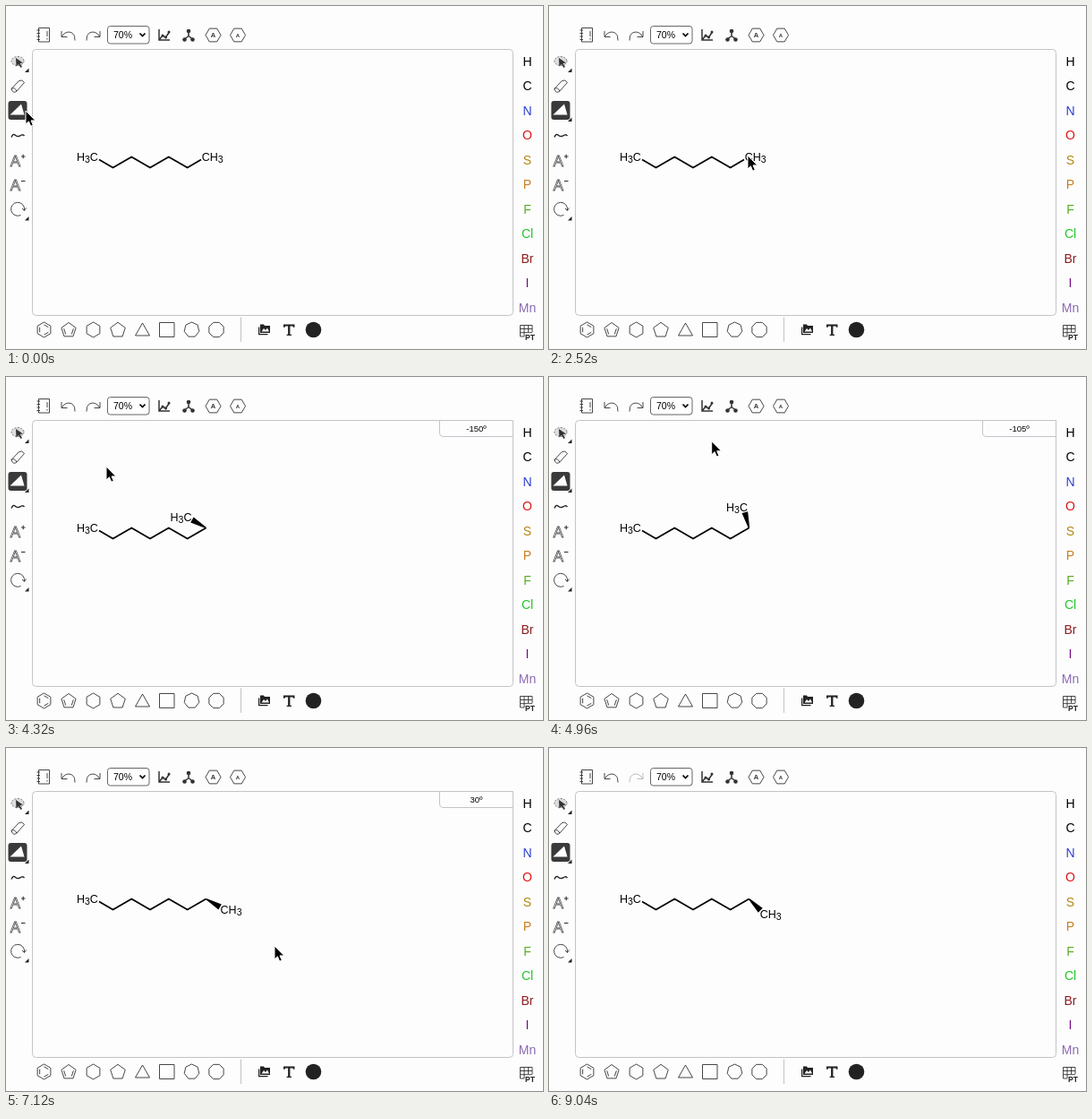
Write an HTML page that moves like this. It is 600x383 px and loops after 9.52 s.

```html
<!DOCTYPE html>
<html lang="en">
<head>
<meta charset="utf-8">
<title>Chain editor</title>
<style>
html, body { margin: 0; width: 100%; height: 100%; overflow: hidden; background: #fdfdfe; }
svg { display: block; font-family: "Liberation Sans", Arial, sans-serif; }
</style>
</head>
<body>
<svg id="stage" width="600" height="383" viewBox="0 0 600 383"></svg>
<script>
const NS = 'http://www.w3.org/2000/svg';
const stage = document.getElementById('stage');
const INK = '#333', THIN = { fill: 'none', stroke: INK, 'stroke-width': 0.9 };

function add(tag, attrs, parent = stage) {
  const el = document.createElementNS(NS, tag);
  for (const k in attrs) el.setAttribute(k, attrs[k]);
  return parent.appendChild(el);
}
const group = (parent = stage) => add('g', {}, parent);
const line = (d, parent, extra) => add('path', { ...THIN, d, ...extra }, parent);
const solid = (d, parent, fill = INK) => add('path', { d, fill }, parent);
function text(s, x, y, size, extra, parent) {
  const el = add('text', { x, y, 'font-size': size, 'text-anchor': 'middle', ...extra }, parent);
  el.textContent = s;
  return el;
}
function corners(n, cx, cy, r, turn = 0) {
  return Array.from({ length: n }, (_, i) => {
    const a = (i / n) * 2 * Math.PI - Math.PI / 2 + turn;
    return [(cx + r * Math.cos(a)).toFixed(2), (cy + r * Math.sin(a)).toFixed(2)];
  });
}
const ring = (n, cx, cy, r, turn) => line('M' + corners(n, cx, cy, r, turn).join('L') + 'Z');
function innerBonds(n, cx, cy, r, edges) {
  const p = corners(n, cx, cy, r);
  edges.forEach(i => line(`M${p[i]}L${p[(i + 1) % n]}`));
}

// Canvas frame
add('rect', { x: 29.5, y: 48.5, width: 537, height: 297, rx: 4, fill: '#fdfdfe', stroke: '#c4c4c8' });

// Top bar
line('M36.5 24.5H48.500V40H36.500ZM34.500 27h3.500M34.500 30.500h3.500M34.500 34h3.500M34.500 37.500h3.500M46 28v6M46 36v1.500');
line('M62 28v6.500h6.500M62.500 34C66 27.500 74 27.500 76.500 33.500L77 38.500');
const redo = line('M105 28v6.500h-6.500M104.500 34C101 27.500 93 27.500 90.500 33.500L90 38.500');
add('rect', { x: 113.5, y: 22.5, width: 46.5, height: 19.5, rx: 3, fill: '#fff', stroke: '#666' });
text('70%', 130.5, 36, 10.5);
line('M149.500 30.500l3 3 3-3', stage, { stroke: '#000', 'stroke-width': 1.7 });
line('M171 26V38H183M171 38l4-5 3.500 2 4-6', stage, { 'stroke-width': 1.5 });
[[175, 33], [178.5, 35], [182, 29]].forEach(([cx, cy]) => add('circle', { cx, cy, r: 1.5, fill: INK }));
line('M204 28V33.500L199.500 37M204 33.500L208.500 37', stage, { 'stroke-width': 1.5 });
[[204, 28], [199.5, 37.5], [208.5, 37.5]].forEach(([cx, cy]) => add('circle', { cx, cy, r: 2.3, fill: INK }));
[[231.5, 7.5], [259, 6]].forEach(([x, size]) => {
  ring(6, x, 32.5, 8.5, Math.PI / 6);
  text('A', x, 32.5 + size * 0.36, size, { 'font-weight': 700, fill: INK });
});

// Element column
'H#000 C#000 N#2a3fd0 O#dd1515 S#b5860f P#c67c1c F#55ad20 Cl#22c428 Br#8c1c1c I#7a0d86 Mn#8a6ab0'
  .split(' ').forEach((item, i) => {
    const [name, rgb] = item.split('#');
    text(name, 582.5, 66.7 + i * 27.5, 14, { fill: '#' + rgb });
  });
line('M574.500 356.500H588V364M574.500 356.500V369H579M574.500 360.500H588M574.500 364.700H588M579 356.500V369M583.500 356.500V364');
text('PT', 585.5, 373, 8.5, { 'font-weight': 700, fill: '#222' });

// Bottom bar
ring(6, 42.5, 361.5, 8.5); innerBonds(6, 42.5, 361.5, 5.6, [0, 2, 4]);
ring(5, 70, 362, 8.5); innerBonds(5, 70, 362, 5.6, [1, 3]);
ring(6, 97.5, 361.5, 8.5);
ring(5, 125, 362, 8.7);
line('M152.500 354L160.500 368H144.500Z');
line('M171.500 353.500H188V369.500H171.500Z');
ring(7, 207.5, 361.5, 8.5);
ring(8, 235, 361.5, 8.8, Math.PI / 8);
line('M262.500 347.500V375', stage, { stroke: '#bbb' });
solid('M284 355.500h4l1 1.500h6v8h-11zM282 358.500h1.300v7.500H292.500v1.300H282z', stage, '#222');
solid('M285.500 363.500l2.500-3.500 2 2 2-2.500 2 4z', stage, '#fdfdfe');
solid('M310 355.500h12.500v3.200h-1.500l-.6-1.100h-3v9.200h1.600v1.200h-5.400v-1.200h1.500v-9.200h-3l-.6 1.100H310z', stage, '#222');
add('circle', { cx: 343.5, cy: 361.5, r: 8.8, fill: '#222' });

// Left bar
add('ellipse', { cx: 13, cy: 61.5, rx: 7, ry: 5, fill: '#ddd', stroke: '#777', 'stroke-dasharray': '2 1.5' });
solid('M11 58l8 5.500-3.500.5 2.500 4-1.500 1-2.500-4-2.500 2.500z');
line('M6 92.500L14.500 83.500Q18 81.500 20.500 85.500L12 95Q8 98.500 6 92.500ZM6 92.500Q9.500 90 12 95');
line('M6 146.500q2-4.500 4-2.500t4 1.500 3.500-1.500 3 1', stage, { stroke: '#222', 'stroke-width': 1.4 });
[172, 199.5].forEach((y, i) => {
  text('A', 10.5, y + 6.5, 17, { fill: '#fdfdfe', stroke: '#555', 'stroke-width': 0.8 });
  line(`M17 ${y - 4}h4.500` + (i ? '' : `M19.200 ${y - 6.3}v4.600`), stage, { 'stroke-width': 1.1 });
});
line('M16.500 233.500A7.500 7.500 0 1 1 20.500 228M18 226l2.500 2.500 2-3');
const corner = y => solid(`M25.500 ${y}v4.500h-4.500z`, stage, '#222');
corner(69.5); corner(235);
const wedgeCorner = corner(124.5);

const wedgeOn = group();
add('rect', { x: 2.5, y: 106, width: 21, height: 21, rx: 3, fill: '#3a3a3a' }, wedgeOn);
solid('M4.500 121.500L17 109.500L20.500 121.500Z', wedgeOn, '#fff');
const wedgeOff = solid('M1.500 116.500L12 107.500L14.500 118Z', stage, '#111');

// Molecule
const HUB = [223.5, 168.5], BOND = 24;
function label(right, parent) {
  const el = add('text', { 'font-size': 12.5, 'text-anchor': right ? 'start' : 'end' }, parent);
  const span = (s, attrs) => { add('tspan', attrs, el).textContent = s; };
  if (right) { span('CH', {}); span('3', { 'font-size': 10.5, dy: 2 }); }
  else { span('H', {}); span('3', { 'font-size': 10.5, dy: 2 }); span('C', { dy: -2 }); }
  return el;
}
function place(el, x, y, right) {
  el.setAttribute('x', x + (right ? -4.7 : 4.7));
  el.setAttribute('y', y + 4.7);
}
const mol = group();
const chain = line('', mol, { stroke: '#000', 'stroke-width': 1.8, 'stroke-linejoin': 'round' });
const zigzag = 'M104 171.500L119.500 180.500L140.300 168.500L161 180.500L181.800 168.500L202.700 180.500L';
place(label(false, mol), 98.2, 168.5, false);
const wedge = solid('', mol, '#000');
const ends = [label(false, mol), label(true, mol)];

// Angle readout
const panel = group();
add('path', { d: 'M484.500 48.500V62Q484.500 66.500 489 66.500H566.500V48.500Z', fill: '#fdfdfe', stroke: '#c4c4c8' }, panel);
const readout = text('', 525.5, 60.5, 9.5, {}, panel);

// Bond menu
const menu = group();
menu.style.filter = 'drop-shadow(0 1px 3px rgba(0,0,0,.3))';
add('rect', { x: 31.5, y: 103.5, width: 41.5, height: 245.5, rx: 4, fill: '#fdfdfe', stroke: '#c0c0c0' }, menu);
[166, 249].forEach(y => line(`M33 ${y}.500H71.500`, menu, { stroke: '#ccc', 'stroke-width': 1.5 }));
add('rect', { x: 33, y: 169.5, width: 38, height: 17.5, rx: 2, fill: '#3a3a3a' }, menu);
solid('M36 183.500L46.500 173L50 181.500Z', menu, '#fff');
const slants = (y, n, dash) => {
  for (let i = 0; i < n; i++) {
    const off = (i - (n - 1) / 2) * 3.4;
    line(`M37 ${y + 3 + off}L49.500 ${y - 3 + off}`, menu,
      { 'stroke-dasharray': Array.isArray(dash) ? dash[i] : dash || 'none' });
  }
};
slants(116, 1); slants(135, 2); slants(154, 3);
for (let i = 0; i < 6; i++) {
  line(`M${37.5 + i * 1.9} ${201.5 - i * 1.5}l${1 + i * 0.45} ${0.8 + i * 0.75}`, menu, { 'stroke-width': 1.1 });
}
line('M37 221l2-3 1 3 2-5 1.500 5 1.500-7 2 6 1-8 2 7', menu);
line('M37 240.500L49.500 233M39 234L47 242.500', menu);
slants(262, 1, '3 2'); slants(280.5, 2, ['3 1.5', 'none']); slants(300, 3, '3 2');
slants(319, 2, ['4 1.5 1 1.5', 'none']); slants(337, 2, '4 1.5 1 1.5');
[[116, 1], [135, 2], [154, 3], [178, 1], [198, 1], [217, 1], [237, 2], [262, 0], [280, 4]]
  .forEach(([y, s]) => text(s, 65.5, y + 2.7, 7.5, { fill: '#c2c2c6' }, menu));

// Pointer
const pointer = add('path', {
  d: 'M0 0V15L3.400 11.800L5.700 17.200L8.300 16.100L6 10.900H10.800Z',
  fill: '#000', stroke: '#fff', 'stroke-width': 1
});

// Pointer path: time, x, y
const PATH = [
  [0, 22, 117], [60, 22, 117], [200, 23, 125], [600, 23, 125], [1080, 68, 165],
  [1520, 62, 340], [1680, 60, 348], [2000, 55, 180], [2100, 55, 180], [2480, 222, 167],
  [2640, 222, 167], [2880, 285, 160], [3080, 300, 115], [3280, 270, 82], [3520, 218, 71],
  [3920, 150, 78], [4320, 112, 100], [4400, 111, 104], [4480, 111, 104], [4840, 155, 76],
  [5160, 235, 74], [5400, 298, 106], [5640, 327, 176], [5720, 327, 186], [5960, 324, 196],
  [6200, 324, 196], [7120, 300, 221], [7200, 298, 222], [7400, 285, 233], [7840, 285, 233],
  [8240, 290, 340], [8560, 180, 190], [8800, 92, 66], [9040, 40, -20]
];
function slope(i, k) {
  const a = PATH[i - 1], b = PATH[i], c = PATH[i + 1];
  if (!a || !c) return 0;
  const still = p => p[1] === b[1] && p[2] === b[2];
  return still(a) || still(c) ? 0 : (c[k] - a[k]) / (c[0] - a[0]);
}
function pointerAt(t) {
  let i = 0;
  while (i < PATH.length - 2 && t >= PATH[i + 1][0]) i++;
  const a = PATH[i], b = PATH[i + 1], span = b[0] - a[0];
  const u = Math.min(1, (t - a[0]) / span), v = 1 - u;
  return [1, 2].map(k =>
    v * v * (1 + 2 * u) * a[k] + u * u * (3 - 2 * u) * b[k] +
    span * u * v * (v * slope(i, k) - u * slope(i + 1, k)));
}

const LOOP = 9520, STEP = 40, PRESS = 2720, RELEASE = 7840, LAG = 80;
const show = (el, on) => el.setAttribute('visibility', on ? 'visible' : 'hidden');

function drawBond(t) {
  const drawn = t >= PRESS;
  chain.setAttribute('d', zigzag + (drawn ? HUB : '218 171.500'));
  show(wedge, drawn);
  show(panel, drawn && t < RELEASE);
  if (!drawn) {
    place(ends[1], ...HUB, true);
    show(ends[0], false);
    show(ends[1], true);
    return;
  }
  // The pointer picture trails the bond slightly.
  const [px, py] = pointerAt(Math.min(t + LAG, RELEASE - STEP));
  const deg = Math.round(Math.atan2(py - HUB[1], px - HUB[0]) * 12 / Math.PI) * 15;
  const a = deg * Math.PI / 180, cos = Math.cos(a), sin = Math.sin(a);
  const at = (d, w) => `${HUB[0] + d * cos - w * sin} ${HUB[1] + d * sin + w * cos}`;
  wedge.setAttribute('d', `M${at(0, -0.7)}L${at(18, -3.4)}L${at(18, 3.4)}L${at(0, 0.7)}Z`);
  const right = Math.abs(deg) <= 90;
  place(ends[+right], HUB[0] + BOND * cos, HUB[1] + BOND * sin, right);
  show(ends[0], !right);
  show(ends[1], right);
  readout.textContent = deg + 'º';
}

function draw(now) {
  const t = Math.floor((now % LOOP) / STEP) * STEP;
  const picking = t >= 160 && t < 2080;
  show(wedgeOn, !picking);
  show(wedgeOff, picking);
  wedgeCorner.setAttribute('fill', picking ? '#2a4fc8' : '#222');
  show(menu, t >= 640 && t < 2080);
  redo.setAttribute('opacity', t < RELEASE ? 1 : 0.35);
  drawBond(t);
  show(pointer, t < 9040);
  pointer.setAttribute('transform', `translate(${pointerAt(t)})`);
}

const start = performance.now();
function tick() {
  draw(performance.now() - start);
  requestAnimationFrame(tick);
}
tick();
</script>
</body>
</html>
```
